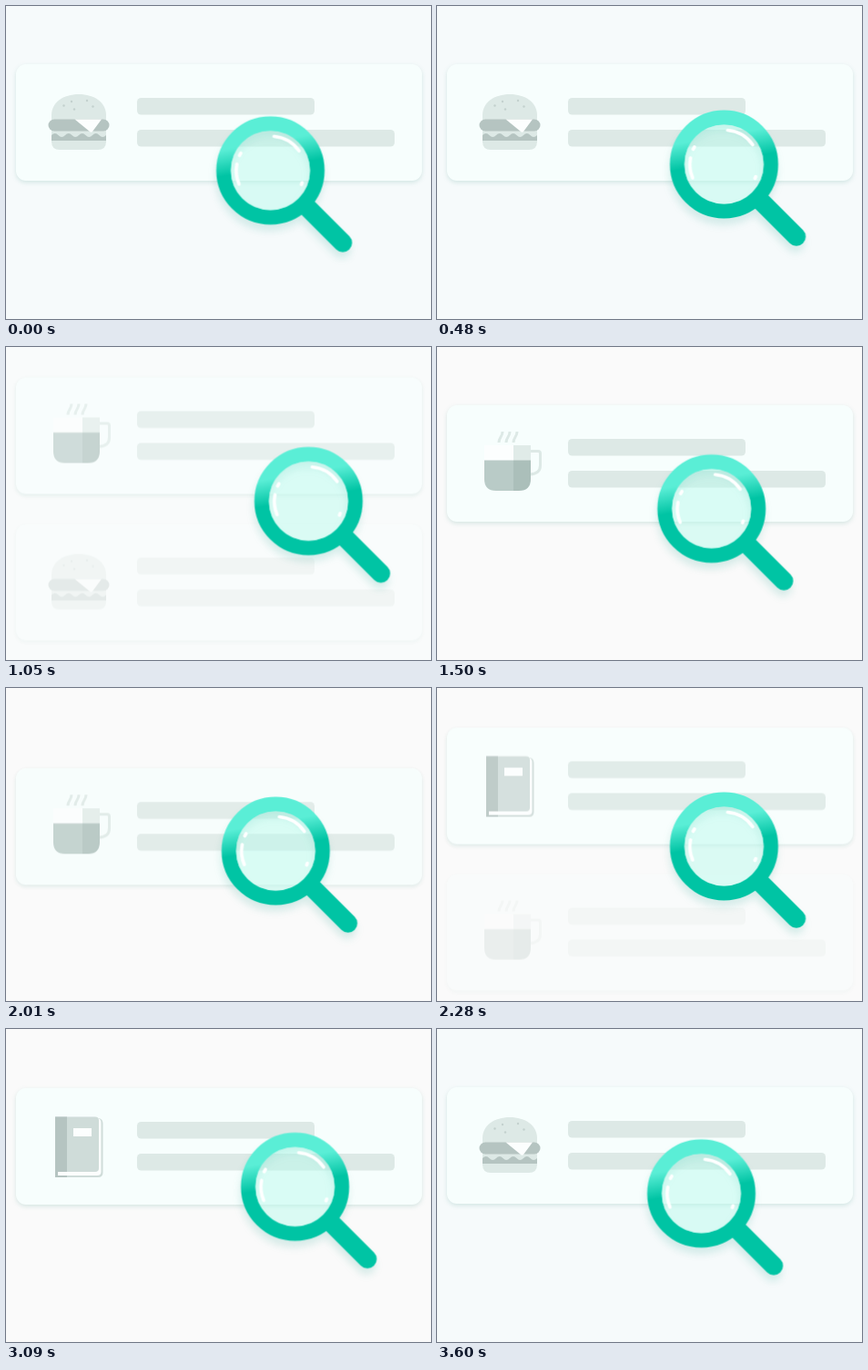
Write an HTML page that moves like this. It is 467 px wide and 344 px high and loops after 3690 ms.

```html
<!DOCTYPE html>
<html lang="en">
<head>
<meta charset="utf-8">
<title>Search</title>
<style>
  html, body { margin: 0; width: 100%; height: 100%; overflow: hidden; background: #fafafa; }
  svg { display: block; width: 467px; height: 344px; }

  .light { fill: #dde9e6; }
  .mid { fill: #cfdcd9; }
  .dark { fill: #b5c4c1; }
  .white { fill: #fcfefe; }

  .panel { fill: #f7fefd; filter: drop-shadow(0 2px 2.5px rgba(0, 110, 95, .14)); }
  .line { fill: none; stroke: #dde9e6; stroke-width: 3; }
  .glare { fill: none; stroke: #fff; stroke-width: 3.6; stroke-linecap: round; }
  .rim { filter: drop-shadow(-1px 7px 4px rgba(0, 150, 130, .14)); }

  .lens { animation: sway 3690ms infinite; }
  .card { animation: pass 3690ms infinite, show 3690ms infinite; }
  .book { animation-delay: -2490ms; }
  .burger { animation-name: first-pass, first-show; }
  .tint { animation: first-show 3690ms infinite; }

  @keyframes sway {
    0%, 48.78%, 97.56%, 100% {
      transform: translate(290.5px, 180.7px);
      animation-timing-function: cubic-bezier(.364, 0, .636, 1);
    }
    24.39%, 73.17% {
      transform: translate(335.5px, 168.5px);
      animation-timing-function: cubic-bezier(.364, 0, .636, 1);
    }
  }
  @keyframes pass {
    0%, 17.89% { transform: translateY(-161px); animation-timing-function: ease-in-out; }
    33.06%, 50.41% { transform: none; animation-timing-function: ease-in-out; }
    65.58%, 100% { transform: translateY(161px); }
  }
  @keyframes show {
    0%, 26.02% { opacity: 0; animation-timing-function: linear; }
    29.81%, 52.03% { opacity: 1; animation-timing-function: linear; }
    65.04%, 100% { opacity: 0; }
  }
  @keyframes first-pass {
    0%, 17.89% { transform: none; animation-timing-function: ease-in-out; }
    33.06%, 50% { transform: translateY(161px); }
    50.01%, 82.93% { transform: translateY(-161px); animation-timing-function: ease-in-out; }
    97.56%, 100% { transform: none; }
  }
  @keyframes first-show {
    0%, 19.51% { opacity: 1; animation-timing-function: linear; }
    32.52%, 91.06% { opacity: 0; animation-timing-function: linear; }
    94.85%, 100% { opacity: 1; }
  }
</style>
</head>
<body>
<svg viewBox="0 0 467 344" xmlns="http://www.w3.org/2000/svg">
  <defs>
    <linearGradient id="teal" gradientUnits="userSpaceOnUse" x1="-3" y1="-31" x2="2" y2="-3">
      <stop offset="0" stop-color="#5aeed6"/>
      <stop offset="1" stop-color="#00c4a4"/>
    </linearGradient>
    <g id="base">
      <rect class="panel" x="11" y="64" width="446" height="128" rx="11"/>
      <rect class="light" x="144" y="101" width="195" height="18.5" rx="4.5"/>
      <rect class="light" x="144" y="136" width="283" height="18.5" rx="4.5"/>
    </g>
  </defs>

  <rect class="tint" width="467" height="344" fill="#f6fafb"/>

  <g class="card burger">
    <use href="#base"/>
    <path class="light" d="M50 125V120C50 106 63 97 80 97S110 106 110 120V125Z"/>
    <g fill="#c3d1ce">
      <circle cx="72" cy="105" r="1.2"/>
      <circle cx="63.5" cy="109.5" r="1.2"/>
      <circle cx="75" cy="113.5" r="1.2"/>
      <circle cx="89" cy="104" r="1.2"/>
      <circle cx="95.500" cy="110.500" r="1.2"/>
    </g>
    <rect class="dark" x="50" y="136" width="60" height="14"/>
    <path class="light" d="M50 137H110V142q-3.750 4 -7.500 0t-7.500 0q-3.750 4 -7.500 0t-7.500 0q-3.750 4 -7.500 0t-7.500 0q-3.750 4 -7.500 0t-7.500 0Z"/>
    <rect class="dark" x="46.500" y="124.500" width="67" height="13" rx="6.500"/>
    <path class="white" d="M75.500 124.500H105L95 138Q93.500 139.500 92 138Z"/>
    <path class="light" d="M50 148H110V149Q110 158 101 158H59Q50 158 50 149Z"/>
  </g>

  <g class="card mug">
    <use href="#base"/>
    <path class="line" d="M68 105q0 -3 2 -6t2 -6M76 105q0 -3 2 -6t2 -6M84 105q0 -3 2 -6t2 -6"/>
    <path class="line" d="M102 114.500H111Q113.500 114.500 113.500 117V130Q113.500 139.500 102 140"/>
    <path class="white" d="M52 108H84V125H52Z"/>
    <path fill="#e0ebe8" d="M84 108H103V125H84Z"/>
    <path fill="#b9cbc7" d="M52 124.500H84V158H65Q52 158 52 145Z"/>
    <path fill="#abbfba" d="M84 124.500H103V145Q103 158 90 158H84Z"/>
  </g>

  <g class="card book">
    <use href="#base"/>
    <path class="mid" d="M54 97H102Q106.500 98 106.500 103V157Q106.500 162 101 162H54Z"/>
    <path class="white" d="M57 97H101Q104.500 98 104.500 102V156Q104.500 160 100 160H57Z"/>
    <path class="mid" d="M54 95.500H98Q102 95.500 102 99.500V152Q102 156 98 156H54Z"/>
    <path class="dark" d="M54 95.500H67V156H57V160H67V162H54Z"/>
    <rect class="white" x="74" y="108" width="20" height="9"/>
  </g>

  <g class="lens">
    <g class="rim" fill="none">
      <path d="M39 39L79.500 79.500" stroke="#00c4a4" stroke-width="20.500" stroke-linecap="round"/>
      <circle r="51.500" stroke="url(#teal)" stroke-width="16"/>
    </g>
    <circle r="43.700" fill="#b4faeb" fill-opacity=".45"/>
    <path class="glare" d="M4 -37.500A38 38 0 0 1 31.500 -21.500M-36.800 -7A37.500 37.500 0 0 0 -34.500 15M-34 -16.500L-32.500 -19M34 15.500L34.800 13.500"/>
  </g>
</svg>
</body>
</html>
```
